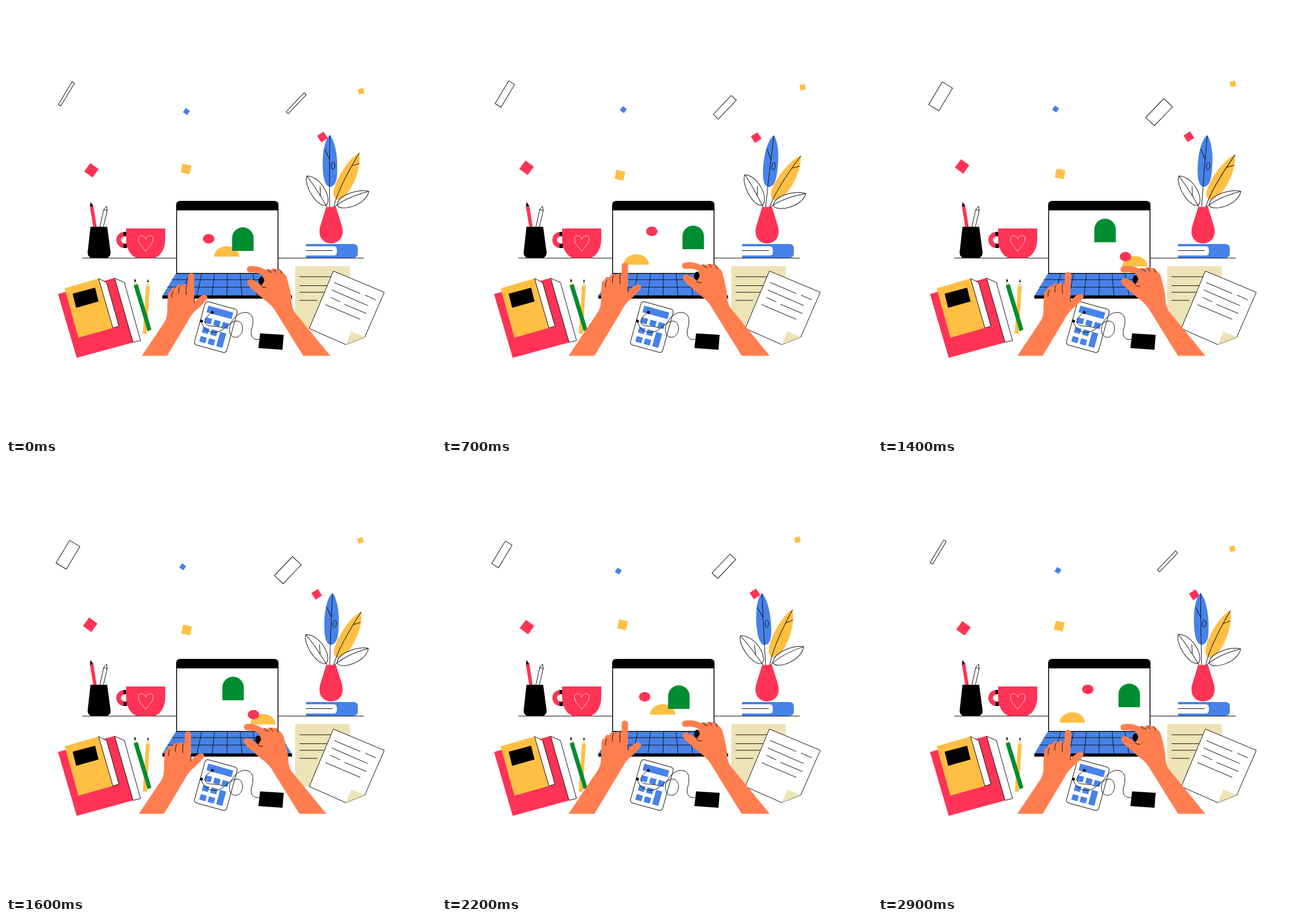
Recreate the animation shown at these times as an HTML page. Size 748 px wide and 748 px high, loop 3000 ms.

```html
<!DOCTYPE html>
<html lang="en">
<head>
<meta charset="utf-8">
<title>Busy desk</title>
<style>
  html, body { margin: 0; width: 100%; height: 100%; overflow: hidden; background: #fff; }
  svg { display: block; width: 100vw; height: 100vh; }
  .red { fill: #ff3355; } .blue { fill: #4782e9; } .yellow { fill: #ffbf43; }
  .green { fill: #008c31; } .beige { fill: #ede3b6; } .skin { fill: #ff7e4f; }
  .paper { fill: #fff; stroke: #111; stroke-width: 1; stroke-linejoin: round; }
  .line { fill: none; stroke: #111; stroke-width: 1; stroke-linecap: round; }
  .finger { fill: none; stroke: #ff7e4f; stroke-width: 11; stroke-linecap: round; }
</style>
</head>
<body>
<svg viewBox="0 0 748 748">
  <clipPath id="deskEdge"><rect width="748" height="608.5"/></clipPath>

  <g id="confetti"></g>
  <path class="line" d="M133 438.5H622"/>

  <!-- pencil cup and mug -->
  <path class="red" d="M146 349L152 348L158 386H152Z"/>
  <path d="M147 341L152 348L146 349Z"/>
  <path class="paper" d="M175 348L176 356L169 386H163L170 354Z"/>
  <path class="line" d="M170 354L176 356"/>
  <path d="M147 384H176L182 429Q182 438.500 172 438.500H152Q142 438.500 142 429Z"/>
  <path d="M211 397H206A10 10 0 0 0 206 417H211" fill="none" stroke="#ff3355" stroke-width="8"/>
  <path d="M204.500 393H210V400H204.500ZM204.500 414H210V421H204.500Z"/>
  <path class="red" d="M209 387H277V405C277 425 266 438.500 255 438.500H231C220 438.500 209 425 209 405Z"/>
  <path d="M243 427C238 419 230 414 230.500 405C231 397 241 398 243 406C245 398 256 397 256 405C256 414 248 419 243 427Z" fill="none" stroke="#ffd0d8"/>

  <!-- plant on a book -->
  <g id="stalks">
    <g>
      <path class="blue" d="M567 224C578 240 580 270 577 298Q574 315 564 314.500Q554 313 553 285C552 255 558 232 567 224Z"/>
      <path class="line" d="M563 350Q564 290 567 226M557 249L565 266"/>
      <ellipse class="line" cx="571" cy="278" rx="3" ry="6" transform="rotate(8 571 278)"/>
    </g>
    <g>
      <path class="yellow" d="M617 257C601 262 571 305 570 327Q572 341 584 336C604 322 620 285 617 257Z"/>
      <path class="line" d="M570 350Q578 318 617 257M604 279L616 275"/>
    </g>
    <g>
      <path class="paper" d="M523 296C517 312 540 348 555 347C570 342 550 296 523 296Z"/>
      <path class="line" d="M523 296Q540 318 558 349M546 314L547 331"/>
    </g>
    <g>
      <path class="paper" d="M631 322C615 317 578 328 576 346C581 359 627 346 631 322Z"/>
      <path class="line" d="M631 322Q592 332 571 350"/>
    </g>
  </g>
  <path class="red" d="M557 349.500H574L584 382C590 401 579 413 565.500 413C552 413 541 401 547 382Z"/>
  <path class="blue" d="M522 414H604Q612 414 612 422V430Q612 438 604 438H522Z"/>
  <path fill="#fff" d="M522 418H570Q575.500 418 575.500 424V428Q575.500 434 570 434H522Z"/>
  <path class="line" d="M522 425.500H568"/>

  <!-- laptop -->
  <path d="M296 466V346Q296 339 304 339H466Q474 339 474 346V466Z"/>
  <path fill="#fff" d="M297.500 355.500H472.500V464.500H297.500Z"/>
  <path id="dome" class="yellow" d="M-22 9A22 18 0 0 1 22 9Z"/>
  <path id="arch" class="green" d="M-18.700 20.500V-2A18.700 18.500 0 0 1 18.700 -2V20.500Z"/>
  <ellipse id="dot" class="red" rx="10" ry="8.300"/>
  <path class="blue" d="M295 466H474L497 504H272Z"/>
  <path id="keys" class="line"/>
  <path d="M272 503.500H497.500V509H272Z"/>

  <!-- books and pencils -->
  <path class="red" d="M90.500 501L189 473L222 585L123 612Z"/>
  <path class="paper" d="M189 473.500L206 481L234 582L221 585Z"/>
  <path class="yellow" d="M102 491L161 474L186 560L126 577Z"/>
  <path class="paper" d="M161 474L175 481L196.500 557L186 560Z"/>
  <path d="M116 500.500L155 490L161 514L122 525Z"/>
  <path class="yellow" d="M243.500 487H250L245 570L238 570Z"/>
  <path class="beige" d="M247 476L250 487H243.500Z"/>
  <path class="green" d="M222 486L229 483.500L253 563L246.500 566Z"/>
  <path class="beige" d="M224 474.500L229 483.500L222 486Z"/>
  <path d="M224 474L226.500 479L223 480ZM247 475L248.500 480H245.500Z"/>

  <!-- papers -->
  <path class="beige" d="M503 452.500H598V561H503Z"/>
  <path class="line" d="M511 471H567M511 486.500H560M511 498H556M511 512H541"/>
  <path class="paper" d="M569.500 461L658 498L624 576L591 589L527.500 561Z"/>
  <path class="beige" d="M601 566L624 576L591 589Z"/>
  <path class="line" d="M571 481L616 500M625 503L643 511M567 494L629 521M565 507L581 514.500M589 519L627 535M556 519.500L616 545"/>

  <!-- calculator, earphones and their case -->
  <g transform="translate(365 558.500) rotate(15.500)">
    <rect class="paper" x="-29" y="-39" width="58" height="78" rx="5"/>
    <path class="blue" d="M-22.500 -32.500H22.500V-20.500H-22.500Z"/>
    <path id="buttons" class="blue"/>
  </g>
  <path class="line" d="M340 548C342 562 354 570 368 567C382 564 390 547 403 548C414 550 415 571 402 576C389 579 386 563 391 552C397 541 406 533 415 533C434 533 430 553 427 563C424 575 431 582 440 580M359 533C344 542 342 552 352 556C362 558 372 556 378 561"/>
  <circle cx="340" cy="548" r="2.600"/><circle cx="359" cy="533" r="2.600"/>
  <path d="M442 569.500L483 572L481 598L439 595Z"/>

  <!-- hands -->
  <g clip-path="url(#deskEdge)">
    <g id="left">
      <path class="skin" d="M214 640L275 549Q281 540 280 520L281 503Q281 495 286 495Q288 486 295 489Q299 480 305 485Q311 480 316 486L327 492V514Q338 502 344 501.500Q351 502 349.500 508Q343 517 335 524Q322 534 316 547L260 640Z"/>
      <path id="leftFinger" class="finger" d="M321 504L321.500 469"/>
      <path class="line" d="M290 495Q287 500 288 506M302 486Q299 491 300 499M313 485Q312 492 313 501M327 506V515"/>
    </g>
    <g id="right">
      <ellipse cx="446" cy="480" rx="5" ry="7.500"/>
      <path class="skin" d="M537 640L473 537Q466 523 450 512L427 492Q419 484 422 479Q428 475 436 481L446 488L451 480L447 467L452 461Q458 459 463 460.500Q468 458 473 459.500Q480 460 483 465Q490 470 491 478Q496 495 498 510Q498 526 504 535L590 640Z"/>
      <path id="rightFinger" class="finger" d="M455 469Q443 459 425.500 461.500"/>
      <path class="line" d="M445 489Q449 493 454 491.500M456 460Q459 465 464 465M466 459Q470 461 471 465M477 460Q481 463 481 467"/>
    </g>
  </g>
</svg>
<script>
const byId = id => document.getElementById(id);
const STEPS = 30, STEP_MS = 100;
let step = 0;

// Cosine swings that crest at the given step: once or twice per loop.
const swing = (peak, cycles) => Math.cos((step - peak) / STEPS * cycles * 2 * Math.PI);
const slow = (amount, peak) => amount * swing(peak, 1);
const fast = (amount, peak) => amount * swing(peak, 2);
const flutter = (amount, peak) => amount * swing(peak, 4);

const place = (el, x, y, angle = 0) =>
  el.setAttribute('transform', `translate(${x} ${y}) rotate(${angle})`);
const turn = (el, angle, x, y) =>
  el.setAttribute('transform', `rotate(${angle} ${x} ${y})`);

function piece(name, size, angle, at) {
  const el = document.createElementNS('http://www.w3.org/2000/svg', 'rect');
  el.setAttribute('class', name);
  byId('confetti').append(el);
  return () => {
    const width = name === 'paper' ? 13 - slow(8, 0) : size;
    el.setAttribute('x', -width / 2);
    el.setAttribute('y', -size / 2);
    el.setAttribute('width', width);
    el.setAttribute('height', size);
    place(el, ...at(), angle);
  };
}

const confetti = [
  piece('red', 18, 36, () => [147.5 + slow(1.2, 28), 282.5 + slow(3.5, 28)]),
  piece('blue', 8.8, 34, () => [311 + slow(5, 4.5), 182.5 + slow(4, 25.5) + fast(2.5, 10)]),
  piece('yellow', 15.7, 12, () => [313.5 + slow(2.5, 20) + fast(4.5, 11.7), 287 + slow(8.5, 9.5)]),
  piece('yellow', 9.5, -14, () => [620 + slow(4.5, 7) + fast(3, 6.5), 139 + slow(8, 2.5) + fast(2.5, 14)]),
  piece('red', 13.5, -32, () => [545.5 + slow(5, 0.5), 227.5 + slow(1.5, 6)]),
  piece('paper', 46, 31, () => [106.8 + slow(3.2, 10), 155.2 + slow(3, 18)]),
  piece('paper', 45.5, 43.5, () => [494 + slow(7.5, 0) + fast(3.5, 16), 177 + slow(7.8, 15)])
];

// Centres of each shape in the three screen layouts.
const layouts = {
  dome: [[384, 427], [447, 444], [338, 441]],
  arch: [[412, 405.5], [395, 390.5], [437, 402.5]],
  dot: [[352.5, 405], [430.5, 436], [365, 392]]
};

let grid = 'M289 476H480M281 489H488';
for (let k = -3; k <= 3; k++) grid += `M${385 + 22.3 * k} 466L${384.5 + 26 * k} 503`;
byId('keys').setAttribute('d', grid);

const button = (x, y, h = 10) => `M${x - 5.5} ${y}h11v${h}h-11Z`;
byId('buttons').setAttribute('d',
  [-15.5, 0, 15].map(x => button(x, -12)).join('') +
  [-15.5, -0.5].map(x => button(x, 5.5) + button(x, 22)).join('') + button(15, 6, 26));

function drawPlant() {
  const [blue, yellow, leftLeaf, rightLeaf] = byId('stalks').children;
  turn(blue, slow(5.2, 9), 565, 350);
  turn(yellow, slow(4.9, 9), 570, 350);
  turn(leftLeaf, slow(4.1, 7), 559, 350);
  turn(rightLeaf, slow(4.1, 7), 572, 350);
}

function drawScreen() {
  const turnNo = Math.floor(step / 10 * 3) % 3;
  for (const id in layouts) place(byId(id), ...layouts[id][turnNo]);
}

function drawHands() {
  place(byId('left'), 2.5 + fast(14, 11.4) + flutter(3, 11.7), fast(10, 0.7) - 8.5);
  turn(byId('leftFinger'), 19 * Math.max(0, fast(1, 11.7)) ** 4, 320, 500);
  place(byId('right'), fast(14, 11) - flutter(4, 4.2) - 3.8, fast(6.5, 1.8) - 6.5);
  turn(byId('rightFinger'), fast(11, 3), 454, 468);
}

function tick() {
  step = Math.floor(performance.now() / STEP_MS) % STEPS;
  confetti.forEach(draw => draw());
  drawPlant();
  drawScreen();
  drawHands();
  requestAnimationFrame(tick);
}
tick();
</script>
</body>
</html>
```
